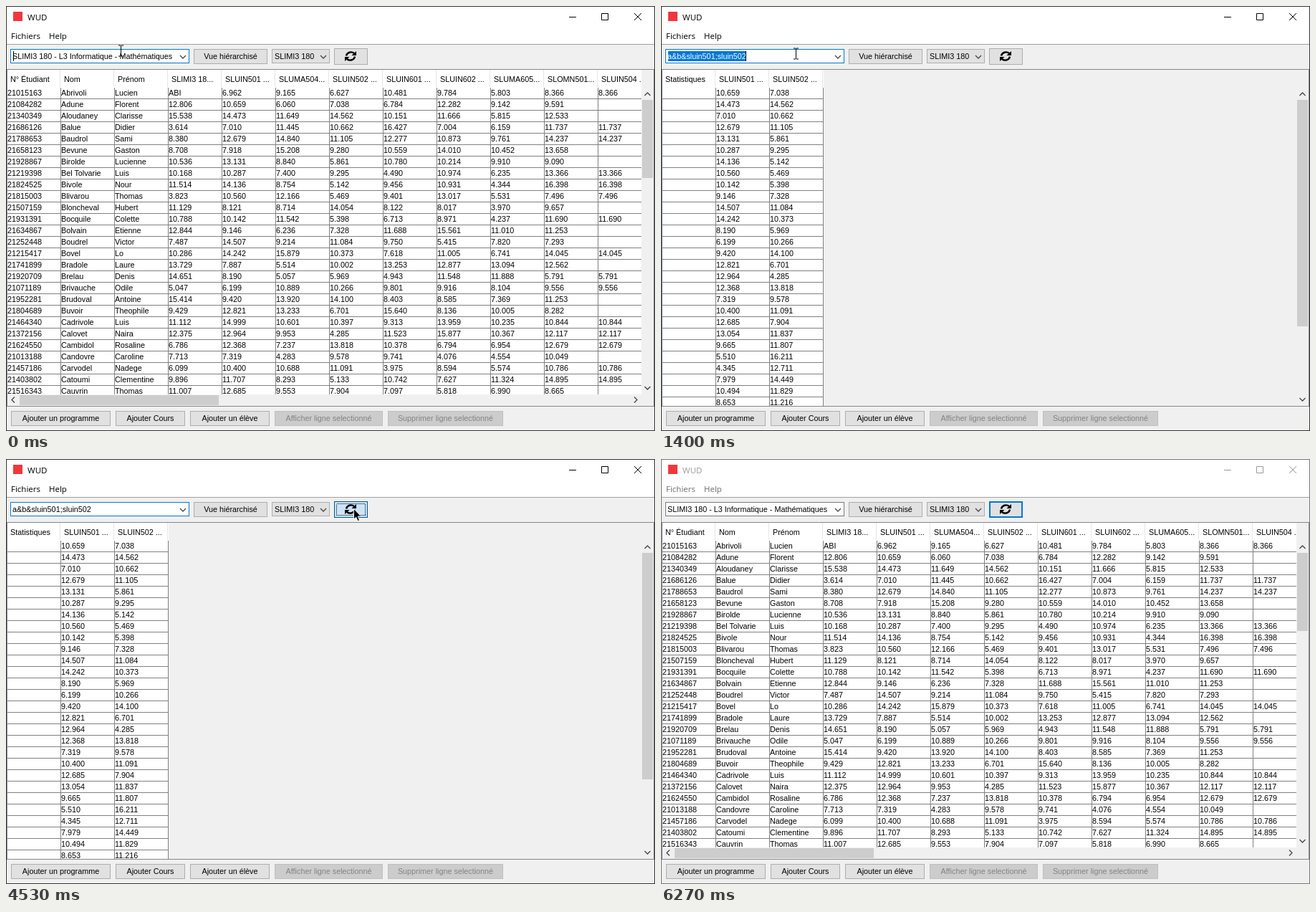
These frames come from a looping animation (906 px wide and 593 px high, 6340 ms). An HTML page:

```html
<!DOCTYPE html>
<html lang="fr">
<head>
<meta charset="utf-8">
<style>
html, body { margin: 0; width: 100%; height: 100%; overflow: hidden; background: #f0f0f0 }
#stage { display: block; width: 906px; height: 593px; font: 10.8px "Liberation Sans", Arial, sans-serif }
rect, line { shape-rendering: crispEdges }
.ui { font: 11.5px "Open Sans", "Noto Sans", sans-serif }
</style>
</head>
<body>
<svg id="stage" viewBox="0 0 906 593"></svg>
<script>
const LOOP = 6340, FPS = 15;
const GREY = '#e1e1e1', EDGE = '#adadad', BLUE = '#0078d7', HOT = '#e5f1fb';
const THUMB = '#cdcdcd', THUMB_HOT = '#a6a6a6';
const COURSE = 'SLIMI3 180 - L3 Informatique - Mathématiques';
const QUERY = 'a&b&sluin501;sluin502';

const names = `Abrivoli Lucien,Adune Florent,Aloudaney Clarisse,Balue Didier,Baudrol Sami,Bevune Gaston,
Birolde Lucienne,Bel_Tolvarie Luis,Bivole Nour,Blivarou Thomas,Bloncheval Hubert,Bocquile Colette,
Bolvain Etienne,Boudrel Victor,Bovel Lo,Bradole Laure,Brelau Denis,Brivauche Odile,Brudoval Antoine,
Buvoir Theophile,Cadrivole Luis,Calovet Naira,Cambidol Rosaline,Candovre Caroline,Carvodel Nadege,
Catoumi Clementine,Cauvrin Thomas`.split(/,\s*/).map(n => n.split(' ').map(s => s.replace('_', ' ')));
const heads = ['N° Étudiant', 'Nom', 'Prénom', 'SLIMI3 18...', 'SLUIN501 ...', 'SLUMA504...',
  'SLUIN502 ...', 'SLUIN601 ...', 'SLUIN602 ...', 'SLUMA605...', 'SLOMN501...', 'SLUIN504 ...'];

// Seeded marks, so every load shows the same class
let seed = 180;
const rnd = () => (seed = (seed * 16807) % 2147483647) / 2147483647;
const mark = () => rnd() < .012 ? 'ABI' : (3 + 7 * (rnd() + rnd())).toFixed(3);
const students = Array.from({ length: 35 }, (_, i) => {
  const marks = Array.from({ length: 8 }, mark);
  const id = 21000000 + Math.floor(rnd() * 960000);
  return [String(id), ...(names[i] || ['', '']), ...marks, rnd() < .55 ? marks[7] : ''];
});
const matches = students.filter((r, i) => i % 5).map(r => ['', r[4], r[6]]);

// Markup helpers
const rect = (x, y, w, h, fill, more = '') => `<rect x="${x}" y="${y}" width="${w}" height="${h}" fill="${fill}" ${more}/>`;
const box = (x, y, w, h, fill, edge, more = '') => rect(x + .5, y + .5, w - 1, h - 1, fill, `stroke="${edge}" ${more}`);
const text = (x, y, s, more = '') => `<text x="${x}" y="${y}" ${more}>${s.replace(/&/g, '&amp;')}</text>`;
const button = (x, w, s, y = 565, id = '', off = false) =>
  box(x, y, w, 21, off ? '#ccc' : GREY, off ? '#bfbfbf' : EDGE, id) +
  text(x + w / 2, y + 14, s, `text-anchor="middle" fill="${off ? '#838383' : '#000'}"`);
const chevron = (x, y, turn = 0) =>
  `<path d="M-4-2 0 2 4-2" transform="translate(${x} ${y}) rotate(${turn})" fill="none" stroke="#444" stroke-width="1.3"/>`;

function table(titles, rows, width, height) {
  let s = rect(2, 89, width, height, '#fff');
  titles.forEach((h, c) => {
    s += text(6 + 75 * c, 106, h) + rect(75 + 75 * c, 89, 1, 24, '#e5e5e5') +
      rect(76 + 75 * c, 114, 1, height, '#808080');
  });
  rows.forEach((row, i) => {
    s += rect(2, 129 + 16 * i, 75 * titles.length, 1, '#808080');
    row.forEach((v, c) => s += text(2 + 75 * c, 125 + 16 * i, v));
  });
  return `<svg x="2" y="89" width="${width}" height="${height}" viewBox="2 89 ${width} ${height}">${s}</svg>`;
}

const arrow = '<path d="M475 69.5A6.6 6 0 0 1 486 66" fill="none" stroke="#000" stroke-width="2.4"/><path d="M489 63v6h-6.5z"/>';

stage.innerHTML =
  rect(0, 0, 906, 593, '#f0f0f0') + rect(1, 1, 904, 52, '#fff') + rect(1, 53, 904, 1, '#a0a0a0') +
  rect(10, 8, 13, 13, '#f0383c') +
  `<g id="title" class="ui">${text(30, 20, 'WUD')}
    <path d="M786 15.5h10M831.5 10.5h9v9h-9zM877 10l10 10M887 10l-10 10" fill="none" stroke="currentColor"/></g>
  <g id="menu" class="ui">${text(7, 46, 'Fichiers')}${text(60, 46, 'Help')}</g>` +
  box(6, 60, 250, 20, '#fff', BLUE, 'id="combo"') + rect(10, 63, 109, 14, BLUE, 'id="mark"') +
  text(9, 74, '', 'id="entry"') + rect(10, 63, 1, 14, '#000', 'id="caret"') + chevron(247, 71) +
  button(262, 103, 'Vue hiérarchisé', 60) +
  box(371, 60, 81, 20, GREY, EDGE) + text(375, 74, 'SLIMI3 180') + chevron(443, 71) +
  box(458, 59, 47, 23, GREY, EDGE, 'id="refresh"') +
  rect(459, 60, 45, 21, 'none', `id="ring" stroke="${BLUE}" stroke-width="2"`) +
  box(461, 62, 41, 17, 'none', '#000', 'id="focus" stroke-dasharray="1 1"') +
  arrow + `<g transform="rotate(180 481 70)">${arrow}</g>` +
  box(1, 88, 904, 471, '#f0f0f0', '#828790') +
  `<g id="full">${table(heads, students.slice(0, 27), 885, 453)}
    ${rect(888, 131, 15, 109, THUMB)}${chevron(895.5, 123, 180)}${chevron(895.5, 533)}
    ${rect(19, 543, 278, 14, THUMB, 'id="slider"')}${chevron(10, 549.5, 90)}${chevron(879, 549.5, -90)}</g>
  <g id="found">${table(['Statistiques', heads[4], heads[6]], matches, 225, 469)}
    ${rect(888, 131, 15, 316, THUMB, 'id="thumb"')}${chevron(895.5, 123, 180)}${chevron(895.5, 549)}</g>` +
  button(7, 139, 'Ajouter un programme', 565, 'id="add"') + button(153, 97, 'Ajouter Cours') +
  button(257, 111, 'Ajouter un élève') + button(375, 151, 'Afficher ligne selectionné', 565, '', true) +
  button(533, 161, 'Supprimer ligne selectionné', 565, '', true) +
  box(0, 0, 906, 593, 'none', '#333', 'id="frame"') +
  `<path id="beam" d="M-3.5-7.5H-1L0-7 1-7.5H3.5M0-7V7M-3.5 7.5H-1L0 7 1 7.5H3.5" fill="none" stroke="#000"/>
  <path id="pointer" d="M0 0V14.5L3.2 11.5 5.6 17 8 16 5.7 10.6H10.2Z" stroke="#fff" stroke-width=".9"/>`;

const $ = Object.fromEntries([...stage.querySelectorAll('[id]')].map(e => [e.id, e]));
const show = (e, on) => e.style.display = on ? '' : 'none';
const set = (e, o) => { for (const k in o) e.setAttribute(k, o[k]); };
const clamp = u => Math.max(0, Math.min(1, u));
const mix = (a, b, u) => `color-mix(in srgb, ${a} ${100 * (1 - u)}%, ${b})`;
const within = (t, ...spans) => spans.some(([a, b]) => t >= a && t < b);

// Mouse moves: start, end, x, y reached; it rests in between
const moves = [[0, 0, 160, 62], [467, 533, 166, 62], [667, 867, 188, 66], [1533, 1900, 330, 585],
  [1900, 2200, 532, 207], [2200, 2480, 915, 250], [3660, 3660, 372, 600], [3670, 4333, 483, 68],
  [4333, 4467, 485, 69], [4670, 5200, 88, 591], [5200, 5270, 70, 620]];

function mouse(t) {
  let x = 0, y = 0;
  for (const [from, to, x1, y1] of moves) {
    if (t < from) break;
    const u = clamp((t - from) / (to - from || 1)), s = to > from ? u * u * (3 - 2 * u) : 1;
    x += (x1 - x) * s;
    y += (y1 - y) * s;
  }
  return [Math.round(x), Math.round(y)];
}

function draw(t) {
  const query = within(t, [1130, 4670]), found = within(t, [1400, 4670]);
  const marked = within(t, [130, 330], [530, 670], [730, 1130], [1400, 4400]);
  show($.full, !found);
  show($.found, found);
  set($.thumb, { fill: within(t, [2400, 2470]) ? THUMB_HOT : THUMB });
  set($.slider, { fill: within(t, [5130, 5330]) ? THUMB_HOT : THUMB });

  $.entry.textContent = query ? QUERY : COURSE;
  set($.entry, { fill: marked ? '#fff' : '#000' });
  show($.mark, marked);
  set($.mark, { width: query ? 109 : 223 });
  show($.caret, within(t, [0, 1900], [2400, 2870], [3400, 3870], [4330, 4400]));
  set($.caret, { x: query ? 118 : t < 130 ? 10 : marked ? 234 : 160 });
  set($.combo, { stroke: t < 4600 ? BLUE : '#7a7a7a' });

  const press = within(t, [4470, 4600]), used = t >= 4400;
  $.refresh.style.fill = !used ? GREY : press ? '#cce4f7' : mix(HOT, GREY, clamp((t - 4900) / 770));
  set($.refresh, { stroke: press ? '#005499' : used ? BLUE : EDGE });
  show($.ring, t >= 4600);
  show($.focus, within(t, [4470, 5870]));

  const cool = t < 5130 ? 1 : clamp((t - 5270) / 400);
  $.add.style.fill = mix(HOT, GREY, cool);
  $.add.style.stroke = mix(BLUE, EDGE, cool);

  const idle = t >= 5870;
  set($.title, { fill: idle ? '#999' : '#000', color: idle ? '#999' : '#000' });
  set($.menu, { fill: idle ? '#6d6d6d' : '#000' });
  set($.frame, { stroke: idle ? '#777' : '#333' });

  const [x, y] = mouse(t), beam = x < 240 && y < 81;
  show($.beam, beam);
  show($.pointer, !beam);
  set(beam ? $.beam : $.pointer, { transform: `translate(${x + .5} ${y + .5})` });
}

// Time advances in whole ticks, as a screen capture does
function tick() {
  const t = Math.floor((performance.now() % LOOP + 4) * FPS / 1000) * 1000 / FPS;
  draw(Math.min(t + 4, LOOP - 1));
  requestAnimationFrame(tick);
}
tick();
</script>
</body>
</html>
```
